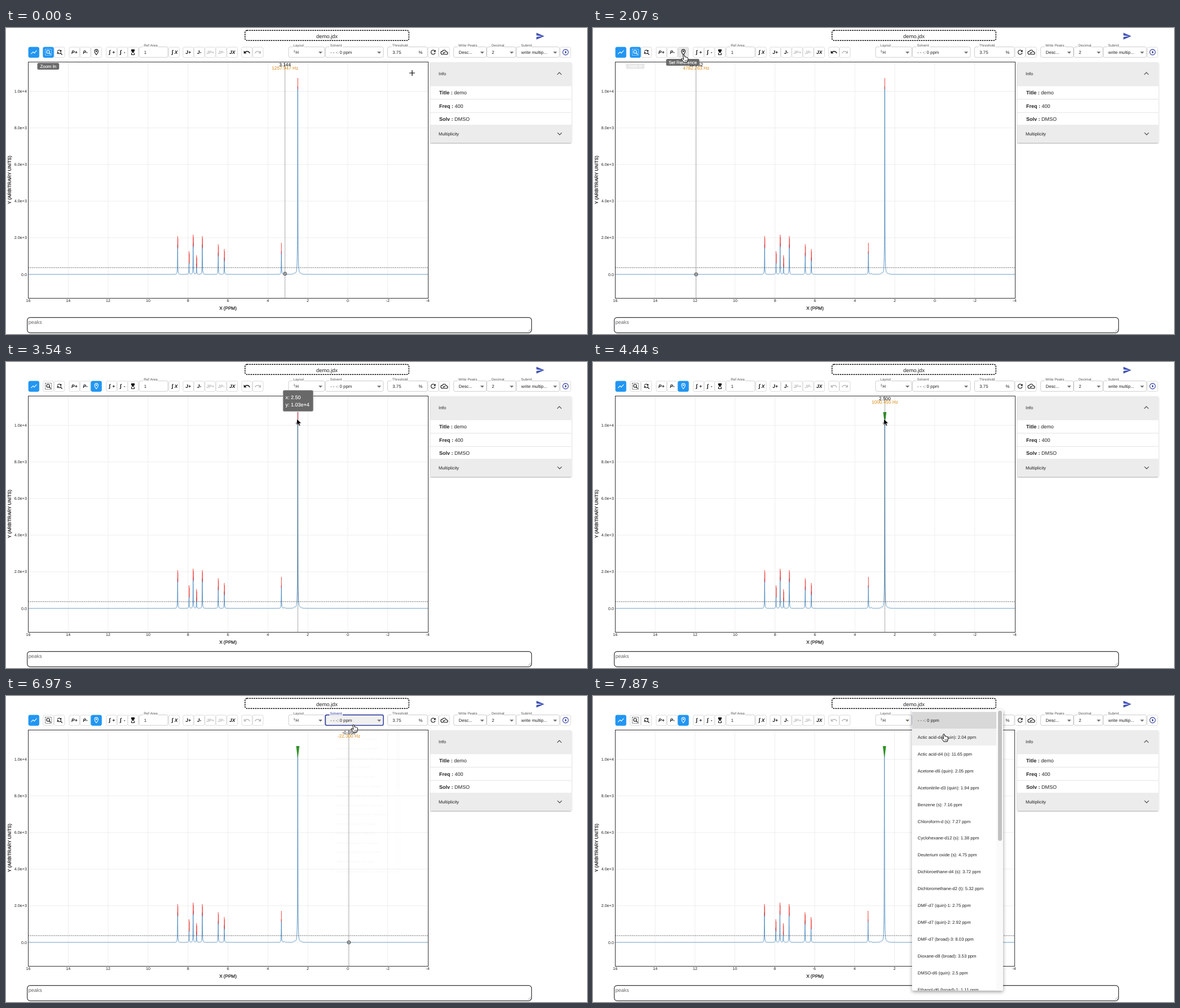
These frames come from a looping animation (1030x544 px, 8000 ms). An HTML page:

```html
<!DOCTYPE html>
<html lang="en">
<head>
<meta charset="utf-8">
<title>Spectrum editor</title>
<style>
html, body { margin: 0; width: 100%; height: 100%; overflow: hidden; background: #fff; }
svg { display: block; width: 100%; height: 100%; }
text { font-family: "Liberation Sans", Arial, sans-serif; font-size: 7.8px; fill: #222; white-space: pre; text-rendering: geometricPrecision; }
.btn { color: #111; }
.btn rect { fill: #fff; stroke: #d2d2d2; stroke-width: .8; }
.btn text { font-weight: bold; font-style: italic; font-size: 8.4px; fill: currentColor; text-anchor: middle; }
.btn.off { color: #bbb; }
.btn.hover rect { fill: #e6e6e6; }
.btn.on { color: #fff; }
.btn.on rect { fill: #2196f3; stroke: #2196f3; }
.field rect.box { fill: none; stroke: #c8c8c8; stroke-width: .9; }
.field .label { font-size: 6.25px; fill: #555; }
.field.hover rect.box { stroke: #222; }
.field.focus rect.box { stroke: #303f9f; stroke-width: 1.6; fill: #f2f2f2; }
.field.focus .label { fill: #303f9f; }
.tick { font-size: 7.2px; }
.axis { font-size: 8.15px; fill: #000; stroke: #000; stroke-width: .15; }
.row { font-size: 9px; }
.tip { fill: #fff; stroke: #fff; stroke-width: .15; }
.mid { text-anchor: middle; }
.end { text-anchor: end; }
</style>
</head>
<body>
<svg id="stage" viewBox="0 0 1030 544" preserveAspectRatio="none" xmlns="http://www.w3.org/2000/svg"></svg>
<script>
const LOOP = 8000, LEFT = 39.5, TOP = 60.5, RIGHT = 748.5, BOTTOM = 480.5, ZERO = 438;
const PPM_PX = 35.4, MHZ = 400.13;
const ppmX = ppm => LEFT + (16 - ppm) * PPM_PX;

const text = (x, y, str, cls = '', extra = '') => `<text x="${x}" y="${y}" class="${cls}" ${extra}>${str}</text>`;
const rect = (x, y, w, h, extra = '') => `<rect x="${x}" y="${y}" width="${w}" height="${h}" ${extra}/>`;
const path = (d, extra = '') => `<path d="${d}" ${extra}/>`;
const line = (x1, y1, x2, y2, extra = '') => path(`M${x1} ${y1}L${x2} ${y2}`, extra);

const ICONS = {
  chart: 'M3.5 18.5l6-6 4 4L22 6.9l-1.4-1.4-7.1 8-4-4L2 17z',
  reset: 'M11 6c1.38 0 2.63.56 3.54 1.46L12 10h6V4l-2.05 2.05C14.68 4.78 12.93 4 11 4c-3.53 0-6.43 2.61-6.92 6H6.1c.46-2.28 2.48-4 4.9-4zm5.64 9.14c.66-.9 1.12-1.97 1.28-3.14H15.9c-.46 2.28-2.48 4-4.9 4-1.38 0-2.63-.56-3.54-1.46L10 12H4v6l2.05-2.05C7.32 17.22 9.07 18 11 18c1.55 0 2.98-.51 4.14-1.36L20 21.49 21.49 20z',
  pin: 'M12 2C8.1 2 5 5.1 5 9c0 5.25 7 13 7 13s7-7.75 7-13c0-3.9-3.1-7-7-7zM7 9c0-2.8 2.2-5 5-5s5 2.2 5 5c0 2.9-2.9 7.2-5 9.9C9.9 16.2 7 11.9 7 9zM12 6.5a2.5 2.5 0 1 0 .01 0z',
  glass: 'M6 2v6l4 4-4 4v6h12v-6l-4-4 4-4V2zm10 14.5V20H8v-3.5l4-4z',
  undo: 'M12.5 8c-2.65 0-5.05 1-6.9 2.6L2 7v9h9l-3.6-3.6c1.4-1.2 3.2-1.9 5.1-1.9 3.5 0 6.5 2.3 7.6 5.5l2.4-.8C21.1 11 17.2 8 12.5 8z',
  reload: 'M17.65 6.35A8 8 0 1 0 19.73 14h-2.08A6 6 0 1 1 16.22 7.78L13 11h7V4z',
  cloud: 'M19.35 10A7.5 7.5 0 0 0 5.35 8 6 6 0 0 0 6 20h13a5 5 0 0 0 .35-10zM19 18H6a4 4 0 0 1-.4-8l1.1-.1.5-1A5.5 5.5 0 0 1 17.4 10.4l.3 1.5 1.5.1A3 3 0 0 1 19 18zm-9-3.8l-2.1-2.1-1.4 1.4L10 17l6-6-1.4-1.4z',
  play: 'M10 16.5l6-4.5-6-4.5zM12 2a10 10 0 1 0 .01 0zm0 18a8 8 0 1 1 .01 0z',
  send: 'M2 21L23 12 2 3v7l15 2-15 2z'
};
const icon = (name, cx, cy, size = 13, fill = 'currentColor', flip = 1) => {
  const s = size / 24;
  return path(ICONS[name], `fill="${fill}" fill-rule="evenodd" transform="translate(${cx} ${cy}) scale(${s * flip} ${s}) translate(-12 -12)"`);
};

const button = (x, content, cls = '', id = '') =>
  `<g class="btn ${cls}" id="${id}">${rect(x, 34, 18.6, 18.4, 'rx="2.5"')}${content}</g>`;
const textButton = (x, str, cls) => button(x, text(x + 9.3, 46, str, '', str.length > 2 ? 'style="font-size:7.9px"' : ''), cls);
const sumButton = (x, sign) =>
  button(x, text(x + 6, 46, '∫', '', 'style="font-size:9.5px"') + text(x + 13, 46, sign));

const field = (x, w, label, value, arrow, id = '') => {
  const gap = label.length * 3.1 + 2;
  return `<g class="field" id="${id}">${rect(x, 33.6, w, 18.6, 'rx="2.5" class="box"')}` +
    rect(x + 7, 32.6, gap, 2, 'fill="#fff"') + text(x + 8.3, 33.2, label, 'label') + text(x + 8.8, 45.7, value) +
    (arrow ? path(`M${x + w - 11} 42h7l-3.5 3.7z`, 'fill="#757575"') : '') + '</g>';
};

const zoomIcon = `<g fill="none" stroke="currentColor">${rect(69.7, 37.6, 11, 11, 'style="fill:none;stroke:currentColor" stroke-dasharray="1.6 1.2"')}
  <circle cx="74.6" cy="42.4" r="2.6" stroke-width="1.1"/>${line(76.5, 44.3, 79.3, 47.1, 'stroke-width="1.3"')}</g>`;

function toolbar() {
  return button(40, icon('chart', 49.4, 43), 'on') +
    button(65.8, zoomIcon, 'on', 'zoomBtn') + button(85.3, icon('reset', 95, 43)) +
    textButton(112, 'P+') + textButton(131.3, 'P-') + button(150.8, icon('pin', 160.2, 43), '', 'pinBtn') +
    sumButton(177.8, '+') + sumButton(197.2, '-') + button(216, icon('glass', 225, 43, 12)) +
    field(236, 51, 'Ref Area', '1') +
    button(288.6, text(295, 46, '∫', '', 'style="font-size:9.5px"') + text(301.5, 46, 'X')) +
    textButton(313.8, 'J+') + textButton(333.2, 'J-') + textButton(352.8, 'JP+', 'off') + textButton(372.2, 'JP-', 'off') +
    textButton(391.8, 'JX') + button(417.8, icon('undo', 427, 43), '', 'undoBtn') +
    button(437.3, icon('undo', 446.6, 43, 13, 'currentColor', -1), 'off') +
    field(501, 64, 'Layout', '', true) + text(509.6, 43, '1', '', 'style="font-size:5.6px"') + text(513.3, 45.6, 'H') +
    field(566.3, 102.7, 'Solvent', '- - -: 0 ppm', true, 'solvent') +
    field(676.5, 70.5, 'Threshold', '3.75') + text(731.6, 46, '%') +
    button(748, icon('reload', 757.3, 43)) + button(767.5, icon('cloud', 777, 43)) +
    field(793.7, 58, 'Write Peaks', 'Desc...', true) + field(852.5, 51.5, 'Decimal', '2', true) +
    field(904.7, 76.3, 'Submit', 'write multip...', true) +
    button(982.5, icon('play', 992, 43, 13, '#303f9f'));
}

function panel() {
  const rows = ['Title|demo', 'Freq|400', 'Solv|DMSO'].map((r, i) => {
    const [key, value] = r.split('|'), y = 118.2 + i * 23.6;
    return text(768, y, `<tspan font-weight="bold">${key} : </tspan>${value}`, 'row') +
      (i < 2 ? line(752, y + 8.4, 1002, y + 8.4, 'stroke="#e2e2e2"') : '');
  }).join('');
  const chevron = (x, y, d) => path(`M${x - 3.8} ${y + d}L${x} ${y - d}L${x + 3.8} ${y + d}`, 'fill="none" stroke="#444" stroke-width="1.1"');
  return rect(752, 61, 250.5, 143, 'rx="2" fill="#fff" filter="url(#soft)"') +
    rect(752, 61, 250.5, 41.5, 'rx="2" fill="#ececec"') + line(752, 102.8, 1002.5, 102.8, 'stroke="#ddd" stroke-width=".7"') +
    text(767, 84, 'Info') + chevron(981, 81, 1.9) + rows +
    rect(752, 172, 250.5, 32, 'fill="#ececec"') + text(767, 190.8, 'Multiplicity') + chevron(981.5, 188, -1.9);
}

// each peak: x, top of its marker
const PEAKS = [[304.25, 370], [324.5, 397], [331.75, 367.5], [337.75, 404], [348, 370], [376.25, 384.5], [387, 393], [488.25, 382], [517.25, 89]];
const BUMPS = [[511.5, 1.8], [523, 1.3], [493.5, 1.6]];

const signal = x => {
  let h = 0;
  for (const [px, top] of PEAKS) h += (ZERO - top - 15) * .1 / (.1 + (x - px) ** 2);
  for (const [bx, size] of BUMPS) h += size / (1 + (x - bx) ** 2);
  return ZERO - h;
};

function chart() {
  let grid = '', curve = '', marks = '';
  for (let ppm = 16; ppm >= -4; ppm -= 2) {
    const x = ppmX(ppm);
    if (ppm < 16 && ppm > -4) grid += line(x, TOP, x, BOTTOM, 'stroke="#ededed" stroke-width=".9"');
    grid += text(x, 487.2, ppm, 'tick mid');
  }
  for (let k = 0; k <= 10; k += 2) {
    const y = ZERO - k * 32.55;
    grid += line(LEFT, y, RIGHT, y, 'stroke="#ededed" stroke-width=".9"') +
      text(37, y + 2.5, k === 0 ? '0.0' : k === 10 ? '1.0e+4' : k + '.0e+3', 'tick end');
  }
  for (let x = LEFT + .25; x < RIGHT; x += .25) curve += (curve ? 'L' : 'M') + x + ' ' + signal(x).toFixed(2);
  PEAKS.forEach(([x, top], i) => {
    const last = i === PEAKS.length - 1;
    marks += line(x, top, x, top + 20, `stroke="#f4413c" stroke-width="1" ${last ? 'id="refMark"' : ''}`);
    if (i < 7) marks += line(x + .6, top + 4, x + .6, top + 22, 'stroke="#e0302c" stroke-width=".7"');
  });
  return grid + path(curve, 'fill="none" stroke="#4b8bc0" stroke-width=".9"') +
    line(LEFT, 426, RIGHT, 426, 'stroke="#444" stroke-width=".9" stroke-dasharray="1.8 1.5"') + marks +
    path('M514.4 89h5.8l-2.5 20h-.8z', 'fill="#2f9426" id="refTri"') +
    rect(LEFT, TOP, RIGHT - LEFT, BOTTOM - TOP, 'fill="none" stroke="#333" stroke-width="1"') +
    `<g id="hover">${line(0, TOP, 0, BOTTOM, 'stroke="#444" stroke-width=".9" stroke-dasharray="1.2 1.2"')}
      <circle id="dot" r="3" fill="#777" fill-opacity=".45" stroke="#333" stroke-width=".8"/>
      ${text(0, 67.6, '', 'mid', 'id="ppm" style="font-size:8.3px;fill:#000"')}
      ${text(0, 74.2, '', 'mid', 'id="hz" style="font-size:8.25px;fill:#d9870f"')}</g>`;
}

const SOLVENTS = ['- - -: 0', 'Actic acid-d4 (quin): 2.04', 'Actic acid-d4 (s): 11.65', 'Acetone-d6 (quin): 2.05',
  'Acetonitrile-d3 (quin): 1.94', 'Benzene (s): 7.16', 'Chloroform-d (s): 7.27', 'Cyclohexane-d12 (s): 1.38',
  'Deuterium oxide (s): 4.75', 'Dichloroethane-d4 (s): 3.72', 'Dichloromethane-d2 (t): 5.32', 'DMF-d7 (quin)-1: 2.75',
  'DMF-d7 (quin)-2: 2.92', 'DMF-d7 (broad)-3: 8.03', 'Dioxane-d8 (broad): 3.53', 'DMSO-d6 (quin): 2.5', 'Ethanol-d6 (broad)-1: 1.11'];

const menu = () => `<g id="menu">${rect(565.7, 24, 161.3, 499.5, 'rx="2.5" fill="#fff" filter="url(#deep)"')}
  ${rect(565.7, 28.3, 149.5, 29.7, 'fill="#d8d8d8"')}${rect(565.7, 58, 149.5, 30, 'fill="#efefef" id="item"')}
  ${rect(715.2, 24, 11.8, 499.5, 'fill="#fafafa"')}${rect(718, 26, 7, 231.5, 'rx="3.5" fill="#c1c1c1"')}
  <g clip-path="url(#menuClip)">${SOLVENTS.map((s, i) => text(575.6, 45.8 + i * 29.95, s + ' ppm')).join('')}</g></g>`;

const tooltip = (id, x, y, w, str) =>
  `<g id="${id}">${rect(x, y, w, 12, 'rx="2.5" fill="#6a6a6a"')}${text(x + w / 2, y + 8.8, str, 'mid tip')}</g>`;

const cursors = `<g id="cross">${path('M-5 0H5M0-5V5', 'stroke="#fff" stroke-width="2.4"')}${path('M-5 0H5M0-5V5', 'stroke="#000" stroke-width="1.2"')}</g>
  ${path('M0 0V11.2L2.6 8.8 4.4 13 6.4 12.1 4.6 8.1H8.2z', 'id="arrow" fill="#000" stroke="#fff" stroke-width=".8"')}
  <g id="hand">${path('M-1.3.8Q0-.6 1.2.8L2 4.2Q3.4 3.4 4.2 4.6 5.4 4.1 6 5.3 7.4 5.2 7.5 6.8L7.2 10 6 13.5H-.2L-2.2 10.4-4.2 8Q-4.4 6.4-2.8 6.9L-.3 8.6z', 'fill="#fff" stroke="#000" stroke-width="1"')}
  ${path('M2 9.3V11.8M3.7 9.2V11.8M5.3 9.2V11.6', 'stroke="#000" stroke-width=".6"')}</g>`;

document.getElementById('stage').innerHTML = `<defs>
  <filter id="soft" x="-5%" y="-5%" width="110%" height="112%"><feDropShadow dx="0" dy="1" stdDeviation="1" flood-opacity=".35"/></filter>
  <filter id="deep" x="-10%" y="-5%" width="120%" height="110%"><feDropShadow dx="0" dy="2.5" stdDeviation="3" flood-opacity=".4"/></filter>
  <clipPath id="menuClip">${rect(565, 24, 162, 499.5)}</clipPath></defs>
  ${rect(0, 0, 1030, 544, 'fill="#fff"')}
  ${rect(423.7, 4.2, 290.6, 18, 'rx="3.5" fill="none" stroke="#000" stroke-width="1.4" stroke-dasharray="2.6 1.4"')}
  ${text(569, 18, 'demo.jdx', 'mid', 'style="font-size:9.4px"')}${icon('send', 947, 14.6, 16, '#3f51b5')}
  ${toolbar()}${panel()}<g id="chart">${chart()}</g>
  ${text(393.5, 500.8, 'X (PPM)', 'axis mid')}${text(0, 0, 'Y (ARBITRARY UNITS)', 'axis mid', 'transform="translate(8.8 270) rotate(-90)"')}
  ${rect(37.7, 514.6, 894, 27.2, 'rx="5" fill="#fff" stroke="#333" stroke-width="1.2"')}
  ${text(39.8, 526.3, 'peaks', '', 'style="font-size:9px;fill:#666"')}
  ${path('M925.5 540L930.5 535M928.5 540L930.5 538', 'stroke="#777" stroke-width=".7"')}
  ${tooltip('zoomTip', 55.5, 62, 38.7, 'Zoom In')}${tooltip('pinTip', 129.6, 55, 59, 'Set Reference')}
  <g id="peakTip">${rect(491.3, 50.6, 53, 37, 'rx="2" fill="#686868" stroke="#8c8c8c" stroke-width="1"')}
  ${text(495.6, 66, 'x: 2.50', 'row tip')}${text(495.6, 79, 'y: 1.03e+4', 'row tip')}</g>
  ${menu()}${cursors}`;

const $ = Object.fromEntries([...document.querySelectorAll('[id]')].filter(e => e.id).map(e => [e.id, e]));
const show = (el, on) => el.setAttribute('display', on ? 'inline' : 'none');
const flag = (el, cls, on) => el.classList.toggle(cls, on);
const place = (el, x, y = 0) => el.setAttribute('transform', `translate(${x} ${y})`);
const zoomed = (el, cx, cy, sx, sy, opacity) => {
  el.setAttribute('transform', `translate(${cx} ${cy}) scale(${sx} ${sy}) translate(${-cx} ${-cy})`);
  el.setAttribute('opacity', opacity);
  show(el, opacity > 0);
};

// time, cursor, cursor position, readout in Hz (trails the cursor by a step)
const MOVES = [
  [0, 'cross', 720, 80, 1257.947], [140, 'cross', 651, 86, -1243.118], [290, 'cross', 528, 95, -497.562],
  [440, 'cross', 366, 100, 871.483], [580, 'cross', 241, 100, 2707.41], [730, 'cross', 200, 84, 4124.106],
  [870, 'cross', 183, 63, 4587.915], [1020, 'hand', 168, 51, 4782.263], [1170, 'hand', 161, 47.5, 4782.263],
  [2810, 'arrow', 182, 62, 4782.263], [2960, 'arrow', 262, 88, 4787.736], [3100, 'arrow', 385, 102, 3887.263],
  [3250, 'arrow', 472, 106, 2496.811], [3400, 'arrow', 508, 103, 1513.292], [3540, 'arrow', 515.5, 101, 1000.455],
  [5780, 'arrow', 576.5, 86, 1000.455], [5930, 'arrow', 592, 78, 338.11], [6080, 'arrow', 604, 70, 157.251],
  [6220, 'arrow', 611, 59, 21.607], [6370, 'hand', 616, 51, -22.3], [7720, 'hand', 619, 59, -22.3], [7870, 'hand', 622, 67.5, -22.3]
];
const at = (list, t) => list.filter(s => s[0] <= t).pop();

function draw(t) {
  const [, kind, cx, cy, hz] = at(MOVES, t);
  for (const name of ['cross', 'arrow', 'hand']) show($[name], name === kind);
  place($[kind], cx, cy);

  const ppm = hz / MHZ, x = ppmX(ppm);
  place($.hover, x);
  $.dot.setAttribute('cy', Math.min(...[-.3, -.1, 0, .1, .3].map(d => signal(x + d))));
  $.ppm.textContent = ppm.toFixed(3);
  $.hz.textContent = hz.toFixed(3) + ' Hz';

  const picked = t >= 2220, marked = t >= 4440, onPeak = t >= 3540 && !marked;
  flag($.zoomBtn, 'on', !picked);
  flag($.pinBtn, 'on', picked);
  flag($.pinBtn, 'hover', t >= 1020 && !picked);
  flag($.undoBtn, 'off', marked);
  show($.peakTip, onPeak);
  show($.refTri, marked);
  show($.refMark, !marked);
  $.refMark.setAttribute('stroke', onPeak ? '#f7a3b4' : '#f4413c');
  $.refMark.setAttribute('stroke-width', onPeak ? 2.6 : 1);

  const [, tip, size] = at([[0, 1, 1], [2070, .15, .85], [2220, 0, .8]], t);
  zoomed($.zoomTip, 75, 66, size, size, tip);
  const [, pinTip] = at([[0, 0], [1020, .5], [1170, 1], [2810, .5], [2960, 0]], t);
  zoomed($.pinTip, 159, 60, 1, 1, pinTip);

  flag($.solvent, 'hover', t >= 6370 && t < 6970);
  flag($.solvent, 'focus', t >= 6970);
  const [, sx, sy, opacity] = at([[0, 1, 1, 0], [6970, .75, .56, .04], [7120, .87, .8, .5], [7270, .97, .95, .88], [7420, 1, 1, 1]], t);
  zoomed($.menu, 617, 43, sx, sy, opacity);
  $.item.setAttribute('opacity', at([[0, 0], [7720, .5], [7870, 1]], t)[1]);
  // the open menu narrows the page a little
  zoomed($.chart, LEFT, 0, t >= 7120 ? .9987 : 1, 1, 1);
}

const start = performance.now();
function tick() {
  draw((performance.now() - start) % LOOP);
  requestAnimationFrame(tick);
}
tick();
</script>
</body>
</html>
```
